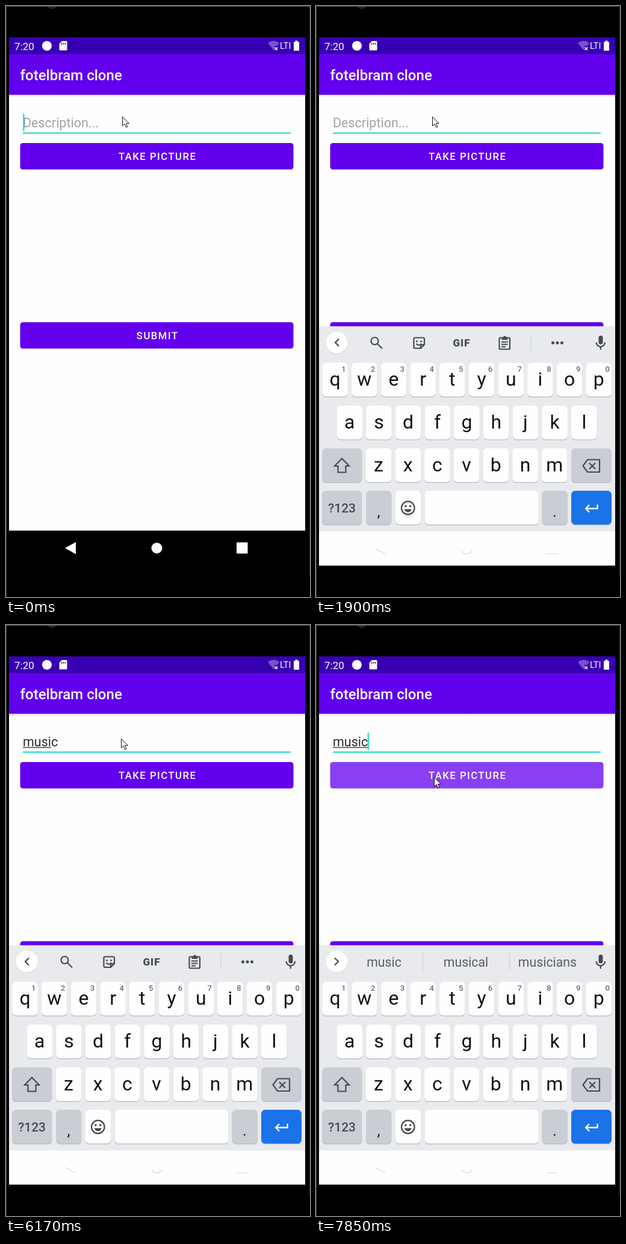
These frames come from a looping animation (505 by 979 pixels, 8 s). An HTML page:

```html
<!DOCTYPE html>
<html lang="en">
<head>
<meta charset="utf-8">
<title>Post form</title>
<style>
html, body { margin: 0; width: 100%; height: 100%; overflow: hidden; background: #000; }
svg { display: block; width: 505px; height: 979px; font-family: Roboto, sans-serif; }
.mid { text-anchor: middle; }
.btn { font-size: 16.7px; font-weight: 500; letter-spacing: 1.5px; fill: #fff; }
.field { font-size: 21.5px; }
.key { font-size: 32px; fill: #111; }
.num { font-size: 13px; font-weight: 500; fill: #6a6d72; }
.tip { font-size: 21.3px; fill: #5a5d61; }
.line { fill: none; stroke: #46494d; stroke-width: 2.2; }
.solid { fill: #46494d; }

/* 8 s loop, every change is a hard cut: 1% = 80 ms */
.caret, .hint, .mu, .s, .i, .c, .mark, .pointer, .board, .panel, .tools, .tips, .take {
  animation: 8s step-end infinite;
}
.caret { animation-name: caret; }
.hint { animation-name: hint; }
.mu { animation-name: mu; }
.s { animation-name: s; }
.i { animation-name: i; }
.c { animation-name: c; }
.mark { animation-name: mark; }
.pointer { animation-name: pointer; }
.board { animation-name: board; }
.panel { animation-name: panel; }
.tools { animation-name: tools; }
.tips { animation-name: tips; }
.take { animation-name: take; }

@keyframes caret {
  0% { opacity: 1; transform: translateX(28.3px); }
  2.5% { opacity: 0; }
  7.125% { opacity: 1; }
  23.75% { opacity: 0; }
  40% { opacity: 1; transform: translateX(58.6px); }
  53.375% { transform: translateX(69.7px); }
  55.125% { transform: translateX(74.6px); }
  58.625% { opacity: 0; }
  60.5% { opacity: 1; }
  65.875% { transform: translateX(85.7px); }
  73.75% { opacity: 0; }
  80.875% { opacity: 1; }
  84.375% { opacity: 0; }
  94.125%, 100% { opacity: 1; transform: translateX(85.7px); }
}
@keyframes hint { 0% { opacity: 1; } 40%, 100% { opacity: 0; } }
@keyframes mu { 0% { fill-opacity: 0; } 40%, 100% { fill-opacity: 1; } }
@keyframes s { 0% { fill-opacity: 0; } 53.375%, 100% { fill-opacity: 1; } }
@keyframes i { 0% { fill-opacity: 0; } 55.125%, 100% { fill-opacity: 1; } }
@keyframes c { 0% { fill-opacity: 0; } 65.875%, 100% { fill-opacity: 1; } }
@keyframes mark {
  0% { width: 0; }
  53.375% { width: 30.5px; }
  55.125% { width: 41.5px; }
  70% { width: 46.7px; }
  80.875%, 100% { width: 58px; }
}
@keyframes pointer {
  0% { transform: translate(193px, 183px); }
  77.125% { transform: translate(191px, 188px); }
  79.125% { transform: translate(191px, 212px); }
  80.875% { transform: translate(196px, 245px); }
  82.625%, 100% { transform: translate(196px, 252px); }
}
@keyframes panel { 0% { opacity: 0; } 21.375%, 100% { opacity: 1; } }
@keyframes board { 0% { transform: translateY(7px); } 23.75%, 100% { transform: none; } }
@keyframes tools { 0% { opacity: 1; } 88.375%, 100% { opacity: 0; } }
@keyframes tips { 0% { opacity: 0; } 88.375%, 100% { opacity: 1; } }
@keyframes take { 0% { fill: #6200ee; } 98.125%, 100% { fill: #893ff2; } }
</style>
</head>
<body>
<svg viewBox="0 0 505 979">
  <defs>
    <linearGradient id="shade" x2="0" y2="1">
      <stop stop-color="#000" stop-opacity=".16"/>
      <stop offset="1" stop-color="#000" stop-opacity="0"/>
    </linearGradient>
  </defs>

  <!-- device edge -->
  <rect width="505" height="979"/>
  <circle cx="76" cy="-4" r="9" fill="#242424"/>
  <path d="M0 .5H505" stroke="#5c5c5c"/>
  <path d="M.5 0V979" stroke="#444"/>
  <path d="M504 0V944" stroke="#2c2c2c"/>

  <!-- app -->
  <rect x="5" y="147" width="492" height="722" fill="#fefefe"/>
  <rect x="5" y="52" width="492" height="28.5" fill="#3700b3"/>
  <rect x="5" y="80" width="492" height="67" fill="#6200ee"/>
  <rect x="5" y="147" width="492" height="4" fill="url(#shade)"/>

  <g fill="#fff">
    <text x="14" y="72.5" font-size="17">7:20</text>
    <circle cx="68" cy="66" r="8"/>
    <path d="M93 58H100a1.5 1.5 0 0 1 1.5 1.5V72a1.5 1.5 0 0 1-1.5 1.5H90a1.5 1.5 0 0 1-1.5-1.5V62.5Z"/>
    <path d="M92.5 61v3M95.5 61v3M98.5 61v3" stroke="#3700b3" stroke-width="1.3"/>
    <path d="M435 61.5Q444.500 54 454 61.500L450.500 66H446V71.500L444.500 73Z" opacity=".32"/>
    <path d="M446.500 68.500l4.500 4.500M451 68.500l-4.500 4.500" stroke="#fff" stroke-width="1.500"/>
    <text x="455" y="71" font-size="14.5">LTI</text>
    <path d="M480.500 57.500h4v2h2.500v14.500h-9v-14.500h2.500Z"/>
    <text x="23.500" y="123" font-size="24" font-weight="500">fotelbram clone</text>
  </g>

  <text class="field hint" x="28" y="201" fill="#a2a2a2">Description...</text>
  <text class="field" x="28" y="201" fill="#2a2a2a"><tspan class="mu">mu</tspan><tspan class="s">s</tspan><tspan class="i">i</tspan><tspan class="c">c</tspan></text>
  <rect class="mark" x="28" y="202.300" height="1.300" width="0" fill="#2a2a2a"/>
  <rect x="28" y="209.500" width="445" height="2.200" fill="#1cdcc9"/>
  <rect class="caret" y="178.500" width="2.200" height="28.500" fill="#1cd6c4"/>

  <rect class="take" x="23.500" y="227" width="454" height="43.700" rx="4.500" fill="#6200ee"/>
  <text class="btn mid" x="251.700" y="255">TAKE PICTURE</text>
  <rect x="23.500" y="523.800" width="454" height="43.700" rx="4.500" fill="#6200ee"/>
  <text class="btn mid" x="251.700" y="552">SUBMIT</text>

  <g fill="#fff">
    <path d="M98 898L116 888V908Z"/>
    <circle cx="250.500" cy="898" r="9"/>
    <rect x="383" y="888.500" width="18.500" height="18.500" rx="1"/>
  </g>

  <!-- keyboard -->
  <g class="panel">
    <rect x="5" y="869" width="492" height="58" fill="#fefefe"/>
    <path d="M98 898.500L115.500 908M242 902Q244.500 907.500 250.500 907.500T259 902M383 907.500H401.500" fill="none" stroke="#d9d9d9" stroke-width="1.200"/>
    <g class="board">
      <rect x="5" y="530.500" width="492" height="340" fill="#e8eaed"/>
      <g id="keys"></g>

      <circle cx="34.500" cy="558.500" r="18" fill="#cfd1d4"/>
      <circle cx="34.500" cy="557.500" r="18" fill="#fff"/>

      <g class="tools">
        <path class="line" d="M38 551.500L32 557.500L38 563.500"/>
        <circle class="line" cx="97.500" cy="555" r="6"/>
        <path class="line" d="M102 559.500L110 567.500" stroke-width="2.600"/>
        <path class="line" d="M164.500 549.500H178a2 2 0 0 1 2 2V561L174 567H164.500a2 2 0 0 1-2-2V551.500a2 2 0 0 1 2-2ZM180 561H176a2 2 0 0 0-2 2V567" stroke-width="2"/>
        <path class="line" d="M166.500 559.500Q171 564 175 559.500" stroke-width="1.800"/>
        <circle class="solid" cx="167.500" cy="555.500" r="1.500"/>
        <circle class="solid" cx="174.500" cy="555.500" r="1.500"/>
        <text class="solid mid" x="242" y="564" font-size="17" font-weight="900" letter-spacing="1">GIF</text>
        <path class="line" d="M306 549.500H320.500a1.500 1.500 0 0 1 1.500 1.500V567a1.500 1.500 0 0 1-1.500 1.500H306a1.500 1.500 0 0 1-1.500-1.500V551a1.500 1.500 0 0 1 1.500-1.500ZM308 556.500H318.500M308 560.500H318.500M308 564.500H315" stroke-width="2"/>
        <path class="solid" d="M308.500 549H311a2.500 2.500 0 0 1 5 0H318.500V553H308.500Z"/>
        <path d="M357 544.500V571" stroke="#cdd0d4" stroke-width="1.200"/>
        <circle class="solid" cx="393.500" cy="558" r="2.500"/>
        <circle class="solid" cx="401" cy="558" r="2.500"/>
        <circle class="solid" cx="408.500" cy="558" r="2.500"/>
      </g>

      <g class="tips">
        <path class="line" d="M31 551.500L37 557.500L31 563.500"/>
        <path d="M177.500 543.500V572M321.500 543.500V572" stroke="#cdd0d4" stroke-width="1.200"/>
        <text class="tip mid" x="113" y="566">music</text>
        <text class="tip mid" x="249" y="566">musical</text>
        <text class="tip mid" x="384.500" y="566">musicians</text>
      </g>

      <rect class="solid" x="469.500" y="546" width="7" height="14.500" rx="3.500"/>
      <path class="line" d="M465.500 557a7.300 7.300 0 0 0 14.600 0M472.800 564.500V569.500" stroke-width="2"/>

      <path class="line" d="M43 749.500L55 762H49.500V772.500H36.500V762H31Z"/>
      <path class="line" d="M451 751.500H471V772H451L443.500 761.800Z"/>
      <path class="line" d="M454 757L464 767M464 757L454 767"/>
      <text class="solid mid" x="43" y="839" font-size="21" font-weight="500">?123</text>
      <text class="mid" x="104" y="846" font-size="26" fill="#222">,</text>
      <text class="mid" x="396.500" y="846" font-size="26" fill="#222">.</text>
      <circle class="line" cx="152.800" cy="831.500" r="10.800"/>
      <circle class="solid" cx="149" cy="828.500" r="1.800"/>
      <circle class="solid" cx="156.600" cy="828.500" r="1.800"/>
      <path class="solid" d="M146.500 833.500H159Q157 838.500 152.800 838.500T146.500 833.500Z"/>
      <path d="M467.500 826V832.500H448M454 826.500L448 832.500L454 838.500" fill="none" stroke="#fff" stroke-width="2.300"/>
    </g>
  </g>

  <path class="pointer" d="M.5 .5V15.500L4 12.300L6.600 18L8.900 17L6.400 11.500H11.300Z" fill="#fff" stroke="#111"/>
</svg>

<script>
const PITCH = 48.7, TOPS = [591, 662, 732.8, 803];
const GRAY = '#cacdd4', WHITE = '#fefefe', BLUE = '#1a73e8';

const cap = (x, y, w, fill) =>
  `<rect x="${x}" y="${y + 1.3}" width="${w}" height="56" rx="6.5" fill="#b6b9be"/>` +
  `<rect x="${x}" y="${y}" width="${w}" height="56" rx="6.5" fill="${fill}"/>`;

const label = (cls, x, y, s) => `<text class="${cls} mid" x="${x}" y="${y}">${s}</text>`;

const row = (letters, first, y, numbered) => [...letters].map((ch, n) => {
  const x = first + n * PITCH;
  const num = numbered ? label('num', x + 14.5, y + 14.5, (n + 1) % 10) : '';
  return cap(x - 21.3, y, 42.6, WHITE) + label('key', x, y + 38, ch) + num;
}).join('');

document.getElementById('keys').innerHTML =
  row('qwertyuiop', 31.5, TOPS[0], true) +
  row('asdfghjkl', 55.7, TOPS[1]) +
  row('zxcvbnm', 104, TOPS[2]) +
  cap(10, TOPS[2], 66.3, GRAY) +
  cap(424, TOPS[2], 67, GRAY) +
  cap(10, TOPS[3], 66.3, GRAY) +
  cap(83, TOPS[3], 42.3, GRAY) +
  cap(131.7, TOPS[3], 42.3, WHITE) +
  cap(180.5, TOPS[3], 189, WHITE) +
  cap(375.5, TOPS[3], 42.3, GRAY) +
  cap(424, TOPS[3], 67, BLUE);
</script>
</body>
</html>
```
